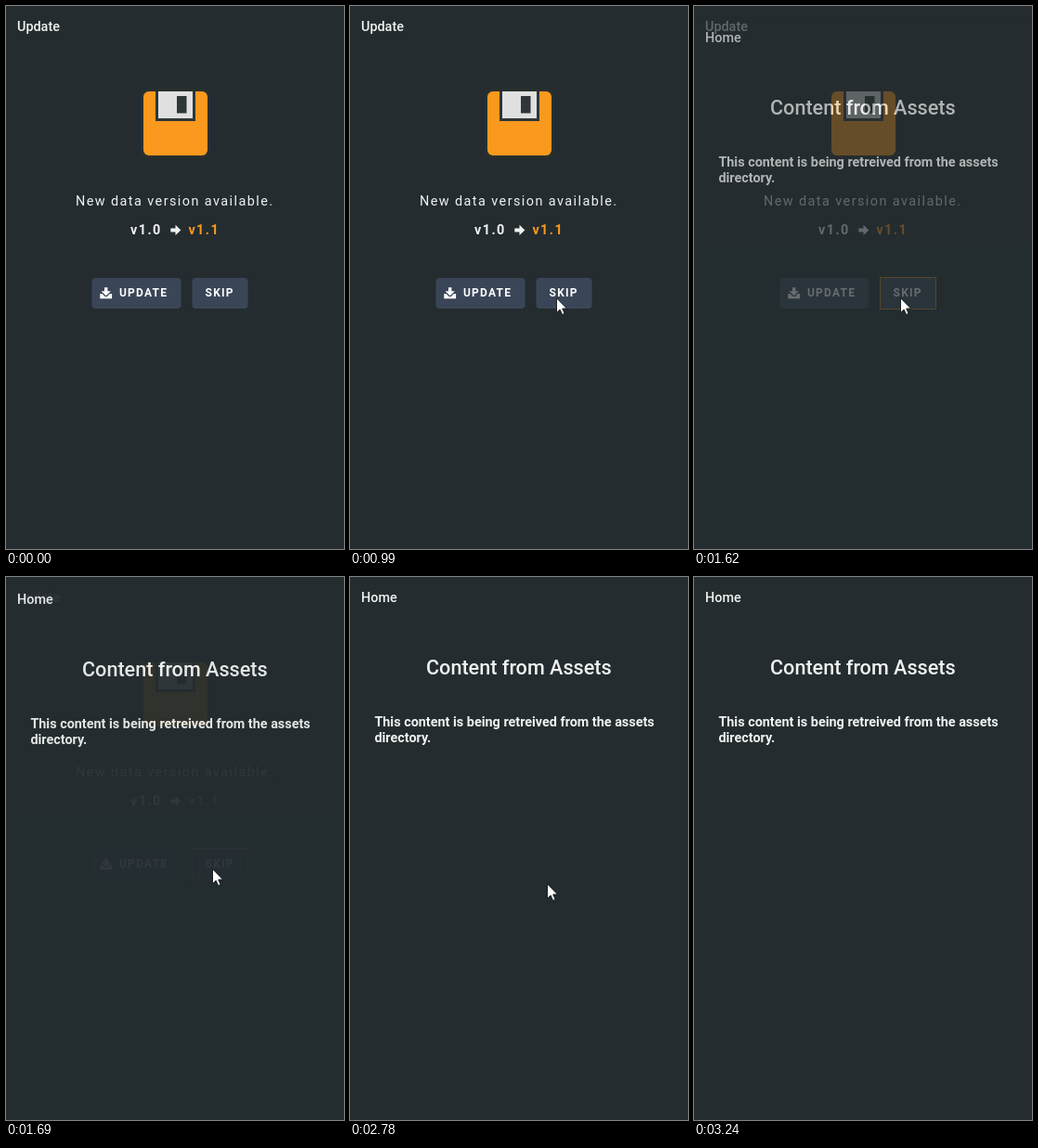
Animation of 364 by 585 pixels, one loop 4100 ms. Source, as an HTML page:

```html
<!DOCTYPE html>
<html lang="en">
<head>
<meta charset="utf-8">
<title>Update</title>
<style>
  html, body { margin: 0; width: 100%; height: 100%; overflow: hidden; background: #242c2f; }
  svg { display: block; width: 100%; height: 100%; }
  text { font: 14.4px Roboto, sans-serif; fill: #f0f1f1; }
  .medium { font-weight: 500; }
  .bold { font-weight: 700; }
  .spaced { letter-spacing: .1em; }
  .label { font-size: 12px; fill: #fff; }
  .heading { font-size: 21.6px; }
  .accent { fill: #fa991d; }
  .button { fill: #3a4657; }
</style>
</head>
<body>
<svg viewBox="0 0 364 585">
  <rect width="364" height="585" fill="#242c2f"/>

  <g id="update">
    <text class="medium" x="12" y="27">Update</text>

    <rect x="145.5" y="89.5" width="74" height="74" rx="8" fill="#2b302e"/>
    <rect class="accent" x="148" y="92" width="69" height="69" rx="6"/>
    <path d="M161 92h43v32h-43z" fill="#2f3637"/>
    <path d="M164 92h37v29h-37z" fill="#e0e0e0"/>
    <path d="M184 97h10.5v18.5h-10.5z" fill="#2f3637"/>

    <text class="spaced" x="75" y="215">New data version available.</text>
    <text class="bold spaced" x="134" y="246">v1.0</text>
    <path d="M177.3 239.4h5.2v-3.6l5.8 5.6-5.8 5.6v-3.6h-5.2z" fill="#f0f1f1"/>
    <text class="bold spaced accent" x="196.4" y="246">v1.1</text>

    <rect class="button" x="92.5" y="293" width="96" height="33" rx="4"/>
    <path d="M106 303.3h3.4v4h3.5l-5.2 5-5.2-5h3.5z
             M101.3 310h2.2l3 2.9h2.4l3-2.9h2.2v5.2h-12.8z" fill="#fff"/>
    <text class="bold spaced label" x="122" y="313.4">UPDATE</text>
    <rect class="button" x="200.5" y="293" width="60" height="33" rx="4"/>
    <rect id="focus" x="200.5" y="292.5" width="60" height="34" fill="none" stroke="#c4861f"/>
    <text class="bold spaced label" x="214.6" y="313.4">SKIP</text>
  </g>

  <g id="home">
    <rect width="364" height="585" fill="#242c2f"/>
    <text class="medium" x="12" y="27">Home</text>
    <text class="medium heading" x="82" y="105">Content from Assets</text>
    <text class="bold" x="26.4" y="161">This content is being retreived from the assets</text>
    <text class="bold" x="26.4" y="178">directory.</text>
  </g>

  <path id="cursor" d="M.5 .7V16.4L4.1 13 6.6 18.5 9.1 17.4 6.7 12H11.5Z"
        fill="#fff" stroke="#101314" stroke-width=".9"/>
  <circle id="click" cx="222" cy="314" r="12" fill="#ff0" opacity=".47"/>
</svg>

<script>
const LOOP = 4100;
const el = id => document.getElementById(id);
const [update, home, focusBox, cursor, click] =
  ["update", "home", "focus", "cursor", "click"].map(el);

// [time, x, y]; no position means the pointer is off stage
const pointer = [
  [0], [760, 321, 345], [840, 283, 336], [910, 240, 320], [990, 222, 314],
  [2780, 212, 330], [2860, 195, 368], [2940, 190, 416], [3010, 212, 468],
  [3090, 264, 522], [3160, 320, 564], [3240]
];
const fadeTimes = [1620, 1690, 1770, 1860];
const FADE_START = 1550, FADE_LENGTH = 280;

// cubic-bezier(.36, .66, .04, 1)
function ease(x) {
  if (x <= 0) return 0;
  if (x >= 1) return 1;
  const curve = (s, a, b) => 3 * (1 - s) ** 2 * s * a + 3 * (1 - s) * s * s * b + s ** 3;
  let lo = 0, hi = 1;
  for (let i = 0; i < 24; i++) {
    const mid = (lo + hi) / 2;
    if (curve(mid, .36, .04) < x) lo = mid; else hi = mid;
  }
  return curve(lo, .66, 1);
}

const show = (node, on) => node.setAttribute("visibility", on ? "visible" : "hidden");

function draw(t) {
  const [, x, y] = pointer.findLast(p => p[0] <= t);
  show(cursor, x !== undefined);
  if (x !== undefined) cursor.setAttribute("transform", `translate(${x} ${y})`);
  show(click, t >= 1160 && t < 1390);
  show(focusBox, t >= 1390);

  const held = fadeTimes.findLast(f => f <= t) ?? 0;
  const p = ease((held - FADE_START) / FADE_LENGTH);
  show(update, p < 1);
  home.setAttribute("opacity", p);
  home.setAttribute("transform", `translate(0 ${40 * (1 - p)})`);
}

const start = performance.now();
function tick() {
  draw((performance.now() - start) % LOOP);
  requestAnimationFrame(tick);
}
tick();
</script>
</body>
</html>
```
